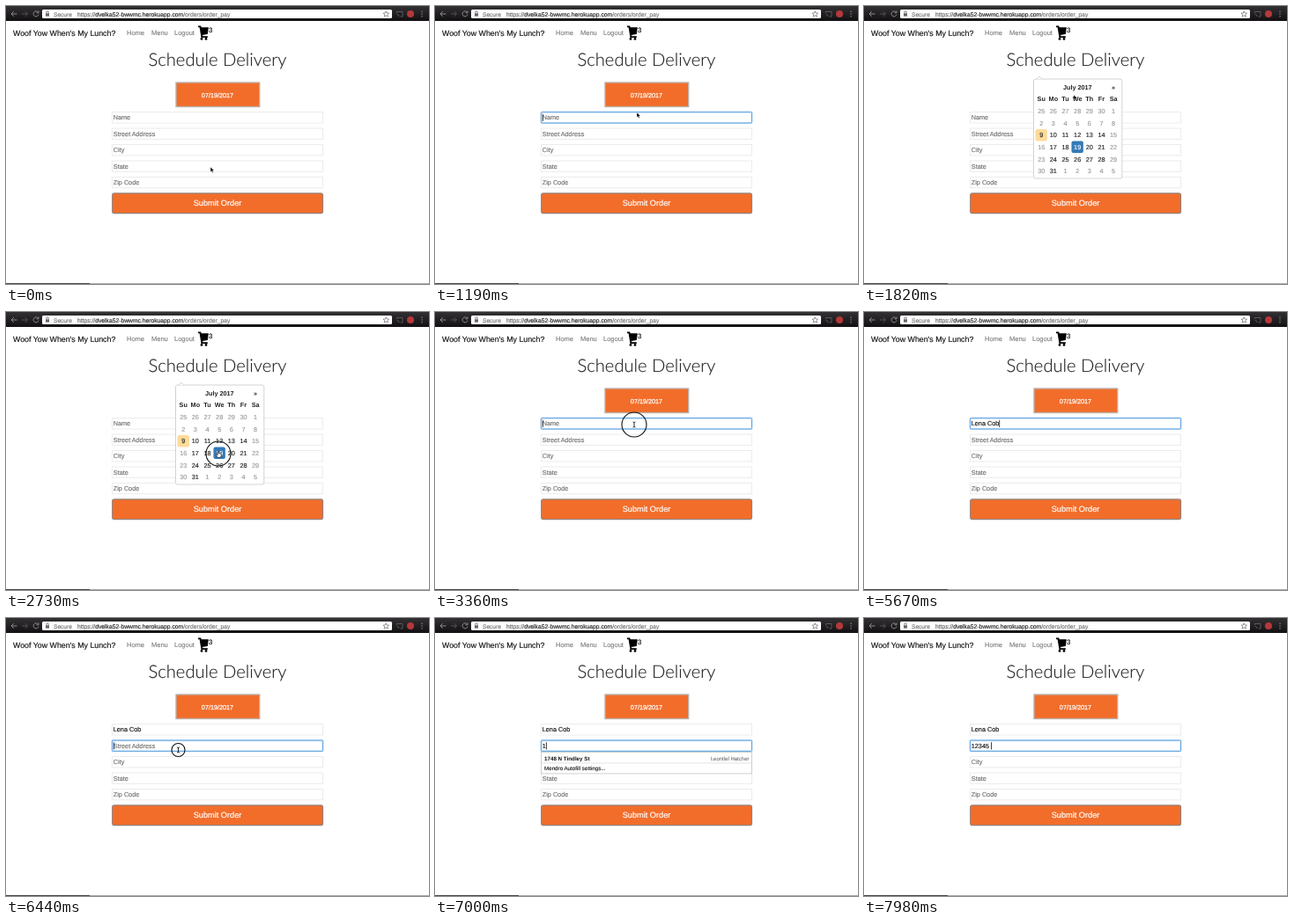
An HTML page for the animation above (8 s loop, 480 by 316 pixels).

```html
<!DOCTYPE html>
<html lang="en">
<head>
<meta charset="utf-8">
<title>Schedule Delivery</title>
<style>
  html, body { margin: 0; width: 100%; height: 100%; overflow: hidden; background: #fff; }
  svg { display: block; width: 100vw; height: 100vh; }
  text { font-family: "Liberation Sans", Arial, sans-serif; white-space: pre; text-rendering: geometricPrecision; }
  .title { font-family: Lato, "Open Sans", sans-serif; font-weight: 300; }
</style>
</head>
<body>
<svg id="stage" viewBox="0 0 480 316">
  <!-- browser bar -->
  <linearGradient id="bar" x2="0" y2="1"><stop stop-color="#333133"/><stop offset="1" stop-color="#121012"/></linearGradient>
  <rect width="480" height="17" fill="url(#bar)"/>
  <rect x="41" y="4" width="397" height="10" rx="1.5" fill="#fff"/>
  <g fill="none" stroke="#8d8b8d" stroke-width="1">
    <path d="M12.5 9H6M8.8 6.2 6 9l2.8 2.8"/>
    <path d="M18 9h6.5M21.7 6.2 24.5 9l-2.8 2.8" stroke="#555"/>
    <path d="M36.4 7A3 3 0 1 0 37 9.6M37 5.4V7.8H34.6"/>
  </g>
  <rect x="45" y="8.3" width="4" height="3.3" fill="#666"/>
  <path d="M45.8 8.3V7a1.2 1.2 0 0 1 2.4 0v1.3" fill="none" stroke="#666" stroke-width=".8"/>
  <path d="M431.3 5.8l.9 2.2 2.4.2-1.8 1.6.6 2.3-2.1-1.3-2.1 1.3.6-2.3-1.8-1.6 2.4-.2z" fill="none" stroke="#666" stroke-width=".7"/>
  <path d="M443.5 8V6.5h6.5v5.5h-2.5M443.5 9.5a2.5 2.5 0 0 1 2.5 2.5" fill="none" stroke="#666" stroke-width=".8"/>
  <circle cx="459" cy="9" r="4" fill="#b5383a"/>
  <g fill="#999"><circle cx="472" cy="6.3" r=".7"/><circle cx="472" cy="9" r=".7"/><circle cx="472" cy="11.7" r=".7"/></g>
  <rect y="315" width="480" height="1" fill="#aaa"/>
  <rect y="315" width="95" height="1" fill="#444"/>
  <!-- cart -->
  <path d="M218 22.5h3.2l.5 1.7h8.1l-1 7.9-5.8.9.2 1.3h5.6v1.6h-7.3l-1.9-11.6h-1.6z"/>
  <circle cx="222" cy="37.4" r="1.4"/><circle cx="227" cy="37.4" r="1.4"/>
</svg>
<script>
const stage = document.getElementById('stage');
const LOOP = 8000, STEP = 70;
const ORANGE = '#f26d2a';

function el(tag, attrs, parent = stage) {
  const node = document.createElementNS('http://www.w3.org/2000/svg', tag);
  for (const key in attrs) node.setAttribute(key, attrs[key]);
  parent.append(node);
  return node;
}
// a hairline outline gives small text its weight
function ink(node, fill) {
  node.setAttribute('fill', fill);
  node.setAttribute('stroke', fill);
}
function label(str, x, y, size, fill, attrs = {}, parent = stage) {
  const node = el('text', { x, y, 'font-size': size, 'stroke-width': .15, ...attrs }, parent);
  ink(node, fill);
  node.textContent = str;
  return node;
}
const box = (x, y, width, height, attrs, parent) => el('rect', { x, y, width, height, ...attrs }, parent);
const show = (node, on) => node.setAttribute('visibility', on ? 'visible' : 'hidden');
const MID = { 'text-anchor': 'middle' }, END = { 'text-anchor': 'end' }, BOLD = { 'font-weight': 700, 'stroke-width': 0 };

// header
label('Secure', 54, 11.5, 6.6, '#777');
const url = label('https://', 81, 11.5, 6.74, '#666');
for (const [part, fill] of [['dvelka52-bwwmc.herokuapp.com', '#222'], ['/orders/order_pay', '#777']])
  ink(el('tspan', {}, url), fill), url.lastChild.textContent = part;
label("Woof Yow When's My Lunch?", 8, 33.6, 8.83, '#111');
label('Home', 137, 33.2, 7.5, '#808080');
label('Menu', 165, 33.2, 7.5, '#808080');
label('Logout', 191, 33.2, 7.5, '#808080');
label('3', 230, 29.5, 7.8, '#111');
label('Schedule Delivery', 240, 68, 20.2, '#222', { ...MID, class: 'title' });

// form
box(193, 87, 94.7, 27.5, { fill: ORANGE, stroke: '#bcb0a8', 'stroke-width': 1.4 });
label('07/19/2017', 240, 103.5, 7.25, '#fff', { ...MID, 'stroke-width': .25 });

const fieldTop = i => 120.6 + 18.45 * i;
const hints = ['Name', 'Street Address', 'City', 'State', 'Zip Code'];
const fields = hints.map((hint, i) => {
  box(120.5, fieldTop(i), 239, 12.4, { fill: '#fff', stroke: '#ececec' });
  return label(hint, 121.8, fieldTop(i) + 8.7, 7.25, '#707070');
});
box(120.7, 212.9, 238.8, 22.7, { rx: 2, fill: ORANGE, stroke: '#94827a', 'stroke-width': 1.2 });
label('Submit Order', 240, 227.4, 9.2, '#fff', { ...MID, 'stroke-width': .2 });

const focus = el('g', {});
box(120.5, 0, 239, 12.4, { rx: 1, fill: 'none', stroke: '#5aa5ec', 'stroke-opacity': .3, 'stroke-width': 2.2 }, focus);
box(120.5, 0, 239, 12.4, { rx: 1, fill: 'none', stroke: '#6aaae6', 'stroke-width': 1 }, focus);
const caret = box(0, 2.2, .8, 8.2, { fill: '#111' }, focus);

// autofill lists
function suggestions(top, rows) {
  const g = el('g', {});
  const rule = top + 2 + rows.length * 10.4;
  box(120.5, top, 239, rule + 12 - top, { fill: '#fff', stroke: '#c4c4c4', 'stroke-width': .8 }, g);
  rows.forEach(([main, note], i) => {
    const y = top + 9 + i * 10.8;
    label(main, 124, y, 6.24, '#111', BOLD, g);
    label(note, 356.5, y, 6.03, '#7c7c7c', END, g);
  });
  el('path', { d: `M121 ${rule}h238`, stroke: '#ddd', 'stroke-width': .8 }, g);
  label('Mendro Autofill settings...', 124, rule + 8.4, 6.23, '#222', {}, g);
  return g;
}
const nameList = suggestions(134, [
  ['Leontiel Hatcher', '1748 N Tindley St'],
  ['Leontiel Hatcher', '2600 N 4th St.'],
  ['Leontiel', '2600 N 4th St Apt 2107']
]);
const streetList = suggestions(152.5, [['1748 N Tindley St', 'Leontiel Hatcher']]);

// calendar
const calendar = el('g', {});
const colX = c => 201.2 + 13.65 * c;
const rowY = r => 122.2 + 13.6 * r - 2.8;
box(192.5, 83, 100.3, 113, { rx: 2, fill: '#fff', stroke: '#cfcfcf', 'stroke-width': .9 }, calendar);
el('path', { d: 'M196 83l3-3 3 3', fill: '#fff', stroke: '#cfcfcf', 'stroke-width': .8 }, calendar);
label('July 2017', 242.3, 94.7, 7.25, '#222', { ...MID, ...BOLD }, calendar);
label('»', colX(6), 94.7, 7.25, '#222', { ...MID, ...BOLD }, calendar);
['Su', 'Mo', 'Tu', 'We', 'Th', 'Fr', 'Sa'].forEach((d, c) =>
  label(d, colX(c), 108.3, 7.25, '#222', { ...MID, ...BOLD }, calendar));
for (let i = 0; i < 42; i++) {
  const date = new Date(2017, 5, 25 + i);
  const day = date.getDate(), july = date.getMonth() === 6;
  const c = i % 7, x = colX(c), y = rowY(i / 7 | 0);
  const today = july && day === 9, chosen = july && day === 19;
  const open = july && day > 9 && c > 0 && c < 6;
  if (today || chosen)
    box(x - 6.7, y - 6.6, 13.4, 13.4, { rx: 2, fill: today ? '#ffdb99' : '#337ab7' }, calendar);
  label(day, x, y + 2.7, 7.25, chosen ? '#fff' : open || today ? '#222' : '#999', MID, calendar);
}

// pointer
const ring = el('circle', { fill: 'none', stroke: '#111', 'stroke-width': 1.1 });
const pointer = el('g', {});
const shapes = {
  arrow: el('path', { d: 'M0 0V5.6L1.3 4.5 2.2 6.5 3.2 6 2.4 4.1H4.1Z', fill: '#000', stroke: '#fff', 'stroke-width': .4 }, pointer),
  beam: el('path', { d: 'M-1.4-3Q0-3 0-2Q0-3 1.4-3M0-2V2M-1.4 3Q0 3 0 2Q0 3 1.4 3', fill: 'none', stroke: '#111', 'stroke-width': .9 }, pointer),
  hand: el('path', { d: 'M-.8-2.6Q0-3.4.6-2.6V-.4L3 .2Q3.6.5 3.4 1.6L2.6 4.4H-.8L-2.8 1.6Q-2.6.6-.8 1.6Z', fill: '#fff', stroke: '#111', 'stroke-width': .7 }, pointer)
};

// time, x, y, shape from that time on
const path = [
  [0, 232, 183, 'arrow'], [70, 232, 183, 'arrow'], [350, 230, 152, 'arrow'], [560, 228, 128, 'beam'],
  [840, 228, 127, 'beam'], [1120, 229, 121, 'arrow'], [1190, 229, 121, 'arrow'], [1470, 238, 101, 'arrow'],
  [1890, 238, 101, 'arrow'], [2240, 255, 124, 'hand'], [2480, 252, 150, 'hand'], [2660, 241, 161, 'hand'],
  [2800, 241, 161, 'arrow'], [2940, 241, 161, 'arrow'], [3220, 226, 128, 'beam'], [5740, 226, 128, 'beam'],
  [6300, 195.5, 150, 'beam'], [LOOP, 195.5, 150, 'beam']
];
const clicks = [700, 1540, 2730, 3360, 6370];
const hiddenSpans = [[4060, 5810], [6860, LOOP]];
const focusSpans = [[700, 1540, 0], [3360, 6370, 0], [6370, LOOP, 1]];
// keystroke times, one per character
const typed = [
  ['Lena Cob', [4060, 4620, 4760, 5040, 5180, 5530, 5600, 5670]],
  ['12345 ', [6860, 7210, 7350, 7560, 7770, 7910]]
];

const within = (t, [from, to]) => t >= from && t < to;

function pointerAt(t) {
  const i = path.findIndex((p, n) => n && t < p[0]);
  const [t0, x0, y0, shape] = path[i - 1], [t1, x1, y1] = path[i];
  const k = (t - t0) / (t1 - t0), e = k * k * (3 - 2 * k);
  return { x: x0 + (x1 - x0) * e, y: y0 + (y1 - y0) * e, shape };
}

function render(t) {
  typed.forEach(([str, keys], i) => {
    const count = keys.filter(k => k <= t).length;
    fields[i].textContent = str.slice(0, count) || hints[i];
    ink(fields[i], count ? '#111' : '#707070');
  });

  const span = focusSpans.find(s => within(t, s));
  show(focus, span);
  if (span) {
    const [start, , i] = span;
    const keys = typed[i][1].filter(k => k <= t);
    const since = Math.max(start, ...keys);
    const width = keys.length ? fields[i].getComputedTextLength() : 0;
    focus.setAttribute('transform', `translate(0 ${fieldTop(i)})`);
    caret.setAttribute('x', 121.9 + width);
    caret.setAttribute('fill-opacity', Math.floor((t - since) / 500) % 2 ? 0 : 1);
  }

  show(nameList, within(t, [4130, 4620]));
  show(streetList, within(t, [6930, 7210]));
  show(calendar, within(t, [1610, 2800]));

  const p = pointerAt(t), away = hiddenSpans.some(s => within(t, s));
  pointer.setAttribute('transform', `translate(${p.x} ${p.y})`);
  for (const name in shapes) show(shapes[name], !away && name === p.shape);

  const click = clicks.find(c => within(t, [c, c + 2 * STEP]));
  show(ring, click);
  ring.setAttribute('cx', p.x);
  ring.setAttribute('cy', p.y);
  ring.setAttribute('r', t - click < STEP ? 14 : 7.5);
}

const begin = performance.now();
function tick() {
  const t = (performance.now() - begin) % LOOP;
  render(Math.floor(t / STEP) * STEP);
  requestAnimationFrame(tick);
}
tick();
</script>
</body>
</html>
```
